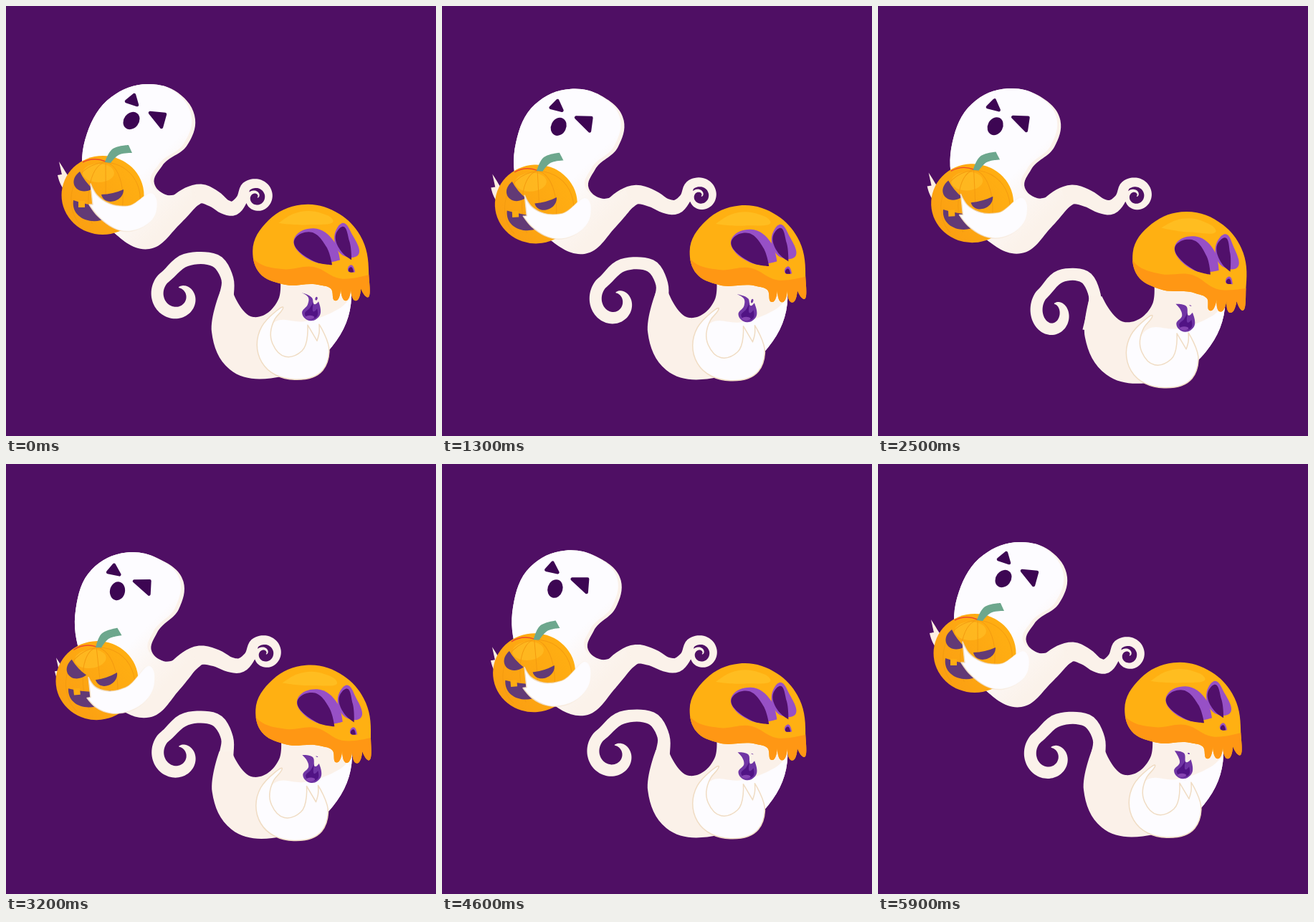
Recreate the animation shown at these times as an HTML page with a canvas. Size 600 by 600 pixels, loop 6 s.

```html
<!DOCTYPE html>
<html>
<head>
<meta charset="utf-8">
<title>Halloween ghosts</title>
<style>
html, body { margin: 0; width: 100%; height: 100%; overflow: hidden; background: #4f0f64; }
canvas { display: block; }
</style>
</head>
<body>
<canvas id="stage" width="600" height="600"></canvas>
<script>
const ctx = document.getElementById('stage').getContext('2d');
const LOOP = 6000, STEP = 100, RAD = Math.PI / 180;
const BG = '#4f0f64', WHITE = '#fdfcff', CREAM = '#fbf2ea', TAN = '#f0dcc3', INK = '#3d0653';
const PURPLE = '#623a76', VIOLET = '#9750c6', DARK = '#51106b';

const lerp = (a, b, k) => a + (b - a) * k;
const clamp = (v, lo = 0, hi = 1) => Math.max(lo, Math.min(hi, v));
const ease = k => (1 - Math.cos(Math.PI * k)) / 2;
const points = s => s.split(', ').map(p => p.split(' ').map(Number));

// Rotates and scales points about a pivot, then moves them.
function swing(pts, [px, py], deg, scale, dx, dy) {
  const c = Math.cos(deg * RAD) * scale, s = Math.sin(deg * RAD) * scale;
  return pts.map(([x, y]) => [px + dx + (x - px) * c - (y - py) * s, py + dy + (x - px) * s + (y - py) * c]);
}

// Closed curve; each tangent follows the circle through a point and its neighbours.
function trace(pts, corners = []) {
  const n = pts.length, at = i => pts[(i + n) % n];
  const handle = (i, length) => {
    if (corners.includes(i % n)) return [0, 0];
    const [a, b, c] = [at(i - 1), at(i), at(i + 1)];
    const p = (b[0] - a[0]) ** 2 + (b[1] - a[1]) ** 2, q = (c[0] - b[0]) ** 2 + (c[1] - b[1]) ** 2;
    const x = (b[0] - a[0]) / p + (c[0] - b[0]) / q, y = (b[1] - a[1]) / p + (c[1] - b[1]) / q;
    const k = length * 0.36 / (Math.hypot(x, y) || 1);
    return [x * k, y * k];
  };
  ctx.beginPath();
  ctx.moveTo(...pts[0]);
  pts.forEach((a, i) => {
    const b = at(i + 1), length = Math.hypot(b[0] - a[0], b[1] - a[1]);
    const s = handle(i, length), e = handle(i + 1, length);
    ctx.bezierCurveTo(a[0] + s[0], a[1] + s[1], b[0] - e[0], b[1] - e[1], ...b);
  });
  ctx.closePath();
}

function shape(pts, color, corners) {
  trace(pts, corners);
  ctx.fillStyle = color;
  ctx.fill();
}

function outline(color, width) {
  ctx.strokeStyle = color;
  ctx.lineWidth = width;
  ctx.lineJoin = 'round';
  ctx.stroke();
}

function oval(x, y, rx, ry, deg, color) {
  ctx.beginPath();
  ctx.ellipse(x, y, rx, ry, deg * RAD, 0, 7);
  ctx.fillStyle = color;
  ctx.fill();
}

function roundTriangle(pts, color) {
  ctx.beginPath();
  pts.forEach(p => ctx.lineTo(...p));
  ctx.closePath();
  ctx.fillStyle = color;
  ctx.fill();
  outline(color, 4.5);
}

// Tapered band along a smooth centre line of [x, y, width].
function ribbon(pts, color) {
  const line = [], left = [], right = [], last = pts.length - 1;
  const at = i => pts[clamp(i, 0, last)];
  for (let i = 0; i < last; i++) {
    const [a, b, c, d] = [at(i - 1), at(i), at(i + 1), at(i + 2)];
    for (let k = 0; k < 1; k += 0.2) {
      line.push(b.map((v, j) => v + k / 2 * (c[j] - a[j] +
        k * (2 * a[j] - 5 * v + 4 * c[j] - d[j] + k * (3 * (v - c[j]) + d[j] - a[j])))));
    }
  }
  line.push(at(last));
  line.forEach(([x, y, w], i) => {
    const a = line[Math.max(i - 1, 0)], b = line[Math.min(i + 1, line.length - 1)];
    const dx = b[0] - a[0], dy = b[1] - a[1], h = w / 2 / (Math.hypot(dx, dy) || 1);
    left.push([x - dy * h, y + dx * h]);
    right.unshift([x + dy * h, y - dx * h]);
  });
  ctx.beginPath();
  left.concat(right).forEach(q => ctx.lineTo(...q));
  ctx.fillStyle = color;
  ctx.fill();
}

// Spiral end of a ribbon; radius and width are functions of progress.
function curl(cx, cy, start, sweep, radius, width) {
  return Array.from({ length: 17 }, (_, i) => {
    const k = i / 16, a = (start + sweep * k) * RAD;
    return [cx + radius(k) * Math.cos(a), cy + radius(k) * Math.sin(a), width(k)];
  });
}

function fade(x0, y0, x1, y1, from, to) {
  const g = ctx.createLinearGradient(x0, y0, x1, y1);
  g.addColorStop(0, from);
  g.addColorStop(1, to);
  return g;
}

// ---- Ghost with the pumpkin ----

const body = points('200 109, 240 121, 264 158, 253 194, 218 223, 207 248, 222 263, 262 250, 267 278, 242 305, 200 339, 146 312, 109 245, 113 178, 147 127');
const tail = points('235 284 32, 254 269 31, 272 262 27, 290 269 24, 305 280 21, 318 282 20, 329 270 16')
  .concat(curl(349, 267, -139, 510, k => 18 * (1 - k ** 1.5) + 2, k => 13 * (1 - k) + 1));
const leftEye = points('179 124, 168 133, 183 138');
const rightEye = points('201 149, 222 151, 217 169');
const backHand = points('74 217, 78 235, 72 236, 75 246, 80 255, 103 270, 84 233');
const frontArm = points('118 248, 127 264, 145 276, 170 279, 207 264, 210 284, 175 314, 128 293, 116 277, 121 277');

// Lean over time: -1 stretched, 0 at rest, 1 leaning, 2 crouched.
const leanKeys = [[0, 0], [975, 1.22], [1950, 0], [3180, 2.02], [3620, -1.2], [4000, -1], [4450, 1.65], [5850, 0], [LOOP, 0]];

function leanAt(t) {
  const i = leanKeys.findIndex(k => k[0] > t);
  const [[t0, u0], [t1, u1]] = [leanKeys[i - 1], leanKeys[i]];
  return lerp(u0, u1, ease((t - t0) / (t1 - t0)));
}

// The head sways, the trunk sinks or stretches, the tail tip slides.
function bend(pts, u) {
  const g = u > 1 ? 0.55 + 0.45 * u : u;
  const drop = u < 0 ? 9 * u : 4 * Math.max(0, u - 1);
  return pts.map(([x, y, w]) => {
    const trunk = clamp((330 - x) / 80), tip = ease(clamp((x - 260) / 80));
    const sway = -18 * g * Math.max(0, (290 - y) / 158) ** 1.5;
    return [
      x + trunk * sway + tip * 12 * clamp(u),
      y + trunk * (g * (2 + 0.075 * (270 - x)) + drop) - tip * 2 * clamp(u),
      w
    ];
  });
}

const carryDrop = u => 9 * u + 5 * u * u;

function pumpkinAt(t, u) {
  const held = [135 - 4 * u, 264 + carryDrop(u), -3 * u];
  if (t < 3400 || t > 4450) return held;
  const h = (Math.min(t, 4300) - 3850) / 100;
  const flight = [82 + 46 * clamp((4350 - t) / 900) ** 1.5, 1.5 + 13.1 * h * h, -0.36 * (t - 3400)];
  if (t <= 4300) return flight;
  const end = [held[0], held[1], held[2] - 360];
  return flight.map((v, i) => lerp(v, end[i], ease((t - 4300) / 150)));
}

// Half moon hanging below the line from a to b.
function moon([x0, y0], [x1, y1], depth) {
  const dx = x1 - x0, dy = y1 - y0, k = depth * 1.33 / Math.hypot(dx, dy);
  ctx.beginPath();
  ctx.moveTo(x0, y0);
  ctx.quadraticCurveTo((x0 + x1) / 2 - dy * 0.1, (y0 + y1) / 2 + dx * 0.1, x1, y1);
  ctx.bezierCurveTo(x1 - dx * 0.1 - dy * k, y1 - dy * 0.1 + dx * k, x0 - dy * k, y0 + dx * k, x0, y0);
  ctx.fillStyle = PURPLE;
  ctx.fill();
}

function drawPumpkin([x, y, deg]) {
  ctx.save();
  ctx.translate(x, y);
  ctx.rotate(deg * RAD);
  oval(0, 0, 57.5, 55, 0, fade(-50, 30, 40, -30, '#fb9f12', '#ffae12'));
  oval(-6, -31, 22, 13, 0, 'rgba(255,188,35,.75)');
  for (let bow = -46; bow <= 54; bow += 25) {
    ctx.beginPath();
    ctx.moveTo(4, -46);
    ctx.bezierCurveTo(bow, -42, bow * 1.2, 15, bow * 0.7, 40);
    outline('#f49b10', 1);
  }
  ctx.beginPath();
  ctx.moveTo(-28, -46);
  ctx.quadraticCurveTo(-12, -54, 4, -47);
  outline('#ec4b2c', 1.4);
  shape(points('3 -46, 13 -64, 36 -70, 41 -59, 22 -56, 11 -45'), '#6da78d', [0, 2, 3, 5]);
  moon([-32, -33], [-14, -9], 18);
  moon([-2, -1], [29, -8], 13);
  moon([-41, 7], [18, 16], 25);
  ctx.fillStyle = '#ffac12';
  ctx.fillRect(-34, 8, 9, 9);
  ctx.restore();
}

function drawPumpkinGhost(t) {
  const u = leanAt(t), lift = Math.max(0, -u), drop = carryDrop(Math.max(0, u));
  const trunk = bend(body, u);
  shape(swing(backHand, [100, 240], 45 * lift, 1 + 0.3 * lift, 26 * lift - 4 * clamp(u), 1.4 * drop - 52 * lift), '#fdeee2', [0, 1, 2]);
  ribbon(bend(tail, u), CREAM);
  shape(trunk, CREAM, [7, 8]);
  ctx.save();
  ctx.clip();
  ctx.translate(-5, -2);
  shape(trunk, fade(190, 240, 245, 295, WHITE, 'rgba(253,248,246,0)'), [7, 8]);
  ctx.restore();

  roundTriangle(bend(leftEye, u), INK);
  roundTriangle(bend(rightEye, u), INK);
  const [mouth] = bend([[175, 160]], u);
  oval(...mouth.slice(0, 2), 10.5, 13, 38 - 13 * u, INK);

  drawPumpkin(pumpkinAt(t, u));
  const carried = frontArm.map(([x, y]) => [x - 3 * clamp(u), y + drop * clamp(1.3 - (x - 118) * 0.0085, 0.5, 1.3)]);
  shape(swing(carried, [200, 268], 48 * lift, 1 + 0.1 * lift, 2 * lift, -10 * lift), WHITE, [0, 8, 9]);
  outline(fade(130, 0, 205, 0, TAN, 'rgba(240,220,195,0)'), 1.4);
}

// ---- Ghost with the skull ----

const skullBody = points('383 383, 381 407, 345 434, 316 398, 299 398, 287 455, 312 507, 385 517, 455 475, 482 405, 480 380');
const skullTail = points('303 430 24, 308 403 20, 309 380 17, 296 357 18, 272 351 17, 246 356 18')
  .concat(curl(240, 404, -116, -330, k => 33 - 21 * k, k => 16 * (1 - k ** 4) + 1));
const skullArm = points('386 423, 357 447, 357 497, 403 521, 442 508, 451 482, 437 444, 437 456, 434 467, 421 445, 413 481, 390 489, 372 471, 375 437');
const skullTop = points('344 342, 366 299, 412 277, 465 290, 494 320, 506 372');
const skullRim = points('437 389, 385 388, 354 373');

const wave = t => (1 - Math.cos(t / 1500 * 2 * Math.PI)) / 2;

function drawSkull(p) {
  const drips = [];
  for (let i = 0; i < 4; i++) drips.push([502 - 14 * i, i ? 411 : 405], [495 - 14 * i, 394]);
  ctx.save();
  ctx.translate(433 + 18 * p, 335 + 18 * p);
  ctx.rotate(p * 9 * RAD);
  ctx.translate(-433, -335);
  shape([...skullTop, ...drips, ...skullRim], '#ffb012', [7, 9, 11]);
  ctx.save();
  ctx.clip();
  shape(points('335 340, 350 357, 385 367, 430 364, 466 380, 515 372, 515 420, 335 420'), '#ff9714', [0, 5, 6, 7]);
  ctx.restore();
  shape(points('380 303, 400 290, 440 289, 455 297, 420 305'), '#ffbd20', [0]);

  shape(points('403 322, 429 310, 458 329, 466 354, 434 358'), VIOLET, [3]);
  shape(points('404 323, 422 315, 447 336, 455 361, 432 357'), DARK, [3]);
  shape(points('461 311, 468 303, 483 319, 489 349, 473 349'), VIOLET);
  shape(points('462 314, 468 308, 479 328, 482 354, 470 345'), DARK, [3]);
  shape(points('477 369, 481 361, 487 371'), VIOLET, [2]);
  shape(points('478 370, 481 364, 485 371'), DARK, [2]);
  ctx.restore();
}

function drawFlame(t, p) {
  const a = t / 700 * 2 * Math.PI, s = Math.sin(a) * 2, c = Math.cos(a) * 2;
  ctx.save();
  ctx.translate(425 + 5 * p, 424 + 24 * p);
  shape([[-12, 4], [-4, -8], [-5 + c, -17], [-12 + s, -24], [2, -19 + c], [6, -8], [11 + s / 2, -12], [13, 7], [0, 15]], '#7035a4', [3, 6]);
  shape([[-8, 6], [-1, -3], [4, -11 + s], [5, 2], [9, -2], [9, 9], [0, 12]], '#511385', [2, 4]);
  oval(-1, 10, 6, 2.5, 0, '#8543b2');
  const rise = (t / 700 + 0.4) % 1;
  oval(8 + s / 2, -12 - 10 * rise, 1.6, 3.5 * (1.1 - rise), 20, '#7035a4');
  ctx.restore();
}

function drawSkullGhost(t) {
  const p = wave(t + 50), lag = wave(t - 70);
  ribbon(skullTail.map(([x, y, w]) => [x + (270 - x) * 0.2 * lag, y + 27 * lag, w]), CREAM);
  shape(skullBody.map(([x, y]) => [x + p * (x < 350 ? 0.14 * (y - 435) : 4), y + 11 * p]), '#fbf1e9', [0, 3, 4, 10]);
  ctx.save();
  ctx.clip();
  ctx.translate(2 * p, 16 * p);
  shape(points('376 440, 415 440, 465 422, 495 400, 500 470, 450 520, 390 520'), WHITE);
  ctx.restore();
  drawSkull(p);
  drawFlame(t, p);
  ctx.save();
  ctx.translate(-6 * p, 18 * p);
  shape(skullArm, WHITE, [6, 8, 9]);
  outline(TAN, 1.5);
  ctx.restore();
}

function frame() {
  const t = Math.floor(performance.now() % LOOP / STEP) * STEP;
  ctx.fillStyle = BG;
  ctx.fillRect(0, 0, 600, 600);
  drawSkullGhost(t);
  drawPumpkinGhost(t);
  requestAnimationFrame(frame);
}
frame();
</script>
</body>
</html>
```
